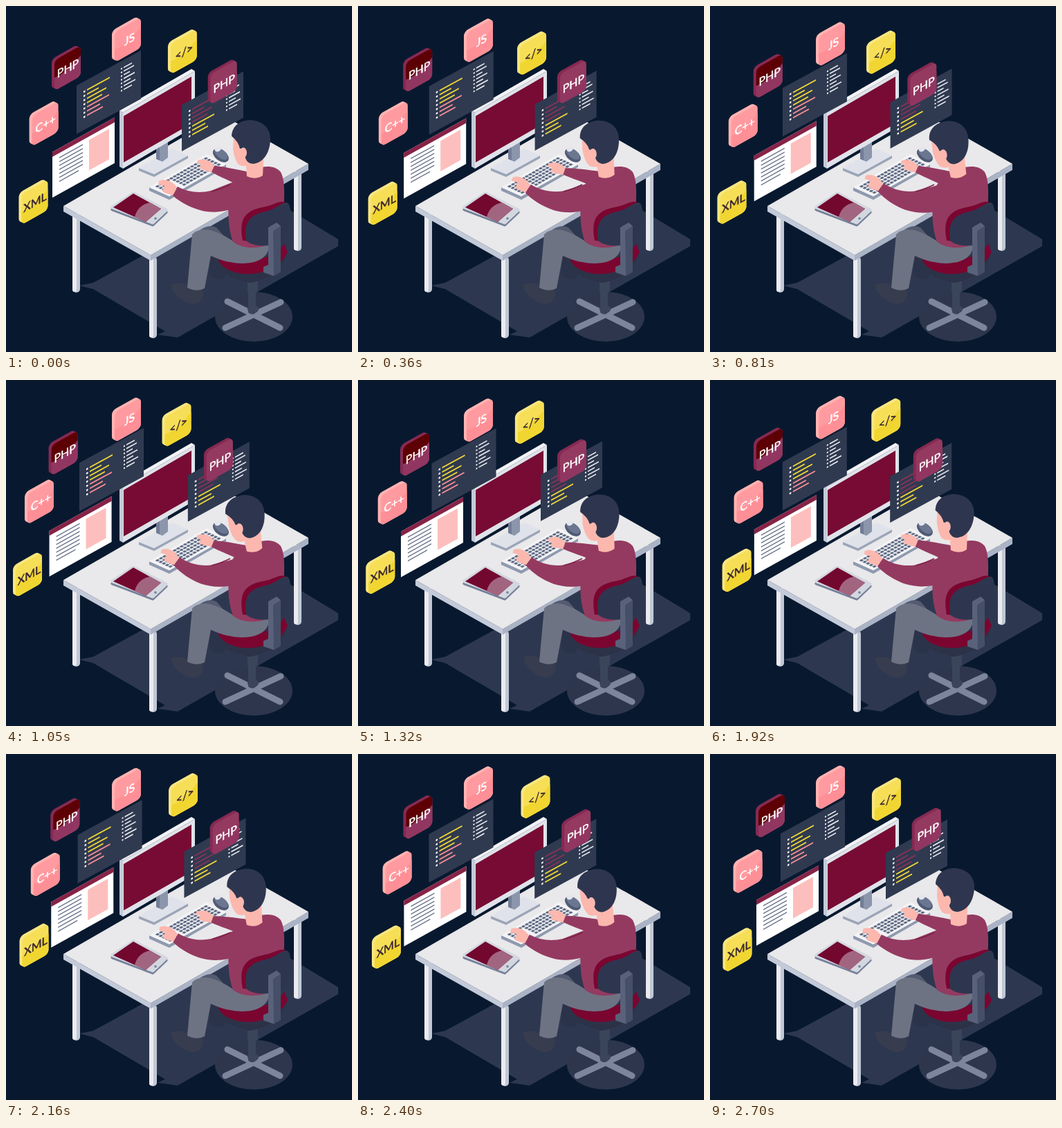
An HTML page for the animation above (2.76 s loop, 500x500 px).

```html
<!DOCTYPE html>
<html lang="en">
<head>
<meta charset="utf-8">
<title>Programmer at a desk</title>
<style>
html, body { margin: 0; height: 100%; overflow: hidden; background: #08192f; }
svg { display: block; width: 100%; height: 100%; }
text { font: 16px Lato, sans-serif; text-anchor: middle; stroke-width: .5; }
</style>
</head>
<body>
<svg viewBox="0 0 500 500">
  <path fill="#2d3850" d="M106 404 126 400 300 305 412 296 480 337V347L248 479 219 475 230 470 126 409Z"/>

  <!-- desk -->
  <g id="legs"></g>
  <path fill="#c3cad9" d="M83 289 209 360V368L83 297Z"/>
  <path fill="#aab4c6" d="M209 360 437 228V237L209 368Z"/>
  <path fill="#e9e8ea" d="M83 289 312 157 437 228 209 360Z"/>

  <!-- monitor -->
  <path fill="#9ba5b8" d="M192 234 214 243 263 216V220L214 247 192 238Z"/>
  <path fill="#dfe2ea" d="M192 234 240 206 263 216 214 243Z"/>
  <path fill="#8b95ab" d="M217 200 234 192V219L226 225 217 221Z"/>
  <path fill="#717c95" d="M217 200 222 198V223L217 221Z"/>
  <path fill="#c3cad9" d="M164 151 169 154V235L164 232Z"/>
  <path fill="#f1f2f5" d="M164 151 268 91 273 94 169 154Z"/>
  <path fill="#e0e2ea" d="M169 154 273 94V174L169 235Z"/>
  <path fill="#770b34" d="M170 159 268 102V170L170 226Z"/>

  <g id="panels"></g>
  <g id="cards"></g>

  <!-- tablet -->
  <g stroke-linejoin="round" stroke-width="5">
    <path fill="#76819a" stroke="#76819a" d="M154 294 184 274 231 298 212 316Z"/>
    <path fill="#d3d7e0" stroke="#d3d7e0" d="M154 291 184 271 231 295 212 313Z"/>
  </g>
  <path fill="#73082f" d="M155 291 184 271 224 293 202 312Z"/>
  <path fill="#a26580" d="M186 305Q190 288 208 284L224 293 202 312Z"/>
  <circle cx="216" cy="307" r="1.800" fill="#76819a"/>

  <!-- keyboard and mouse -->
  <path fill="#8f9ab0" d="M207 262 236 275 318 229V233L236 280 207 267Z"/>
  <path fill="#f3f3f5" d="M207 262 290 214 318 229 236 275Z"/>
  <g transform="matrix(.83 -.48 .29 .14 207 262)" fill="none" stroke="#5d6983" stroke-width="11">
    <path stroke-dasharray="4.5 1.5" d="M6 18H95M6 34H24M30 34H95M6 50H24M30 50H95M6 66H24M30 66H95M6 82H24M30 82H95"/>
  </g>
  <g transform="rotate(37 311 215)">
    <ellipse cx="311" cy="216" rx="13" ry="8" fill="#4f5a75"/>
    <ellipse cx="310" cy="214" rx="11.500" ry="6" fill="#6b7690"/>
    <path fill="#e4e6ec" d="M298 214Q298 207 306 207V212Q303 218 298 214Z"/>
  </g>

  <!-- chair base -->
  <ellipse cx="358" cy="449" rx="56" ry="36" fill="#2d364c"/>
  <g stroke="#7c859c" stroke-width="9" stroke-linecap="round">
    <path d="M320 427 396 465M397 428 317 465"/>
  </g>
  <path fill="#3a445b" d="M349 390H364V412L361 415V443Q357 448 350 443V415L349 412Z"/>
  <ellipse cx="357" cy="438" rx="8" ry="6" fill="#3a445b"/>

  <!-- far leg, seat and shoe -->
  <path fill="#2b334a" d="M295 340 325 350 316 392Q305 400 294 388Z"/>
  <path fill="#2c3348" d="M302 360Q300 389 352 400Q392 394 405 362Z"/>
  <path fill="#7a0630" d="M305 358C325 374 385 372 402 343L407 355C396 384 352 394 326 383Q306 376 305 358Z"/>
  <path id="shoe" fill="#373d4e" d="M239 402C253 397 264 405 284 409C287 422 281 432 268 430C255 428 238 414 239 402Z"/>
  <path fill="#545b70" d="M280 324Q292 315 304 320L318 336 290 345Z"/>
  <path fill="#6e7384" d="M269 330C284 316 306 325 330 341C350 350 366 349 380 344C382 374 336 380 296 361L287 408Q275 414 262 407Z"/>

  <!-- arms, body, head -->
  <g id="farArm">
    <path fill="#fcb8ae" d="M301 231C295 222 284 220 277 223L276 227 282 229 279 234Q286 238 300 241Z"/>
    <path fill="#943a60" d="M301 231C315 232 332 236 352 240L342 262C325 253 309 247 297 240Z"/>
  </g>
  <path fill="#943a60" d="M346 242C362 233 385 226 397 240C405 255 401 280 402 305L382 344Q350 356 328 341C320 318 321 298 322 270Q330 250 346 242Z"/>
  <g id="nearArm">
    <path fill="#fcb8ae" d="M247 262C240 252 229 249 221 253L220 258 229 260 226 268Q234 273 243 273Z"/>
    <path fill="#943a60" d="M248 261C262 269 280 271 296 267L334 252 344 286C318 299 300 299 284 296C268 292 252 284 241 274Z"/>
  </g>
  <path fill="none" stroke="#7d2249" stroke-width="1.500" d="M297 268Q310 265 324 258"/>
  <g id="head">
    <path fill="#fcb8ae" d="M329 185 328 206Q330 223 336 229 341 232 347 231L348 246Q360 252 371 245L373 205Z"/>
    <path fill="#2e364f" d="M326 188C327 172 339 165 354 165C372 166 383 178 382 194C381 212 372 227 357 228Q349 228 346 220L345 206 338 206Q336 196 326 188Z"/>
    <ellipse cx="343" cy="212" rx="5" ry="7.500" fill="#fcb8ae"/>
  </g>

  <!-- chair back -->
  <path fill="#7a0630" d="M342 339C336 307 346 296 370 291C392 287 395 279 407 285L395 342Z"/>
  <path fill="#2e364f" d="M347 339C343 311 353 302 375 297C393 293 399 281 408 285C414 295 410 315 408 331C402 347 360 352 347 339Z"/>
  <path fill="#59627a" d="M379 320 391 313 397 318V384L387 390 372 385V377L379 374Z"/>
  <path fill="#454f67" d="M386 325 397 318V384L387 390Z"/>
</svg>
<script>
const $ = id => document.getElementById(id);
const YELLOW = '#f3d935', PINK = '#ff8f96', WINE = '#8e3159';
const rect = (x, y, w, h, fill, rx = 0) =>
  `<rect x="${x}" y="${y}" width="${w}" height="${h}" rx="${rx}" fill="${fill}"/>`;
const face = (x, y, slope, content) => `<g transform="matrix(1 ${slope} 0 1 ${x} ${y})">${content}</g>`;

// Desk legs: x, top, bottom
$('legs').innerHTML = [[96, 300, 414], [207, 362, 480], [416, 238, 354]].map(([x, top, end]) =>
  rect(x, top, 11, end - top, '#c0c8d6', 5) + rect(x, top, 6, end - top - 1, '#ebebee', 3)).join('');

function codePanel(width, height, colors) {
  let s = rect(0, 0, width, height, '#2f3a50');
  [33, 17, 28, 22, 32, 19, 23].forEach((w, i) => {
    const row = 13.5 + i * 6.1;
    s += rect(10, row, 2.5, 2.5, '#fff') + rect(15, row, w, 2, colors[i]);
  });
  [12, 15, 9, 16, 10, 17, 12].forEach((w, i) => {
    const row = 10 + i * 5.3;
    s += rect(64, row, 2, 2, '#fff') + rect(68, row, w, 1.8, '#e9ebf0');
  });
  return face(0, 0, -.545, s);
}

function pagePanel() {
  let s = rect(0, 0, 90, 66, '#fff') + rect(0, 0, 90, 7, '#862347') + rect(53, 12, 29, 44, '#fdbfbd');
  for (let i = 0; i < 7; i++) s += rect(10, 13 + i * 5.7, i == 6 ? 28 : 34, 1.5, '#656d86');
  return face(0, 0, -.555, s);
}

function card({ label, front, side, low, top, ink = '#fff', tx = 19.5, ty = 28 }) {
  const lower = 'M0 25Q16 29 38 14V38a6 6 0 0 1-6 6H6a6 6 0 0 1-6-6Z';
  const upper = 'M0 25V6a6 6 0 0 1 6-6H32a6 6 0 0 1 6 6V14Q16 29 0 25Z';
  let s = '';
  for (let i = 0; i < 4; i++) s += face(i, 19.5 + i / 2, -.56, rect(0, 0, 38, 44, side, 6));
  return s + face(4, 21.5, -.56, rect(0, 0, 38, 44, front, 6) +
    `<path d="${lower}" fill="${low}"/>` + (top ? `<path d="${upper}" fill="${top}"/>` : '') +
    `<text x="${tx}" y="${ty}" fill="${ink}" stroke="${ink}">${label}</text>`);
}

const sway = a => (1 - Math.cos(a)) / 2;
const orbit = (cx, cy, rx, ry, px, py) => a => [cx + rx * Math.cos(a + px), cy + ry * Math.sin(a + py)];
const drift = (x, y, dx, dy) => a => [x + dx * sway(a), y + dy * sway(a)];

const pink = { front: '#ff9ba0', side: '#ffb3b2', low: PINK };
const yellow = { front: '#f6df57', side: '#f9e680', low: '#f1d632', ink: '#3a2630' };
const wine = { front: '#943a60', side: '#862a53', low: '#913660' };

const floats = [];
function add(layer, content, path) {
  const g = document.createElementNS('http://www.w3.org/2000/svg', 'g');
  g.innerHTML = content;
  $(layer).append(g);
  floats.push({ g, path });
}

const rows = (a, b) => [a, a, a, a, b, b, b];
add('panels', codePanel(93, 70, rows(YELLOW, PINK)), drift(102, 115, 4.5, 5.5));
add('panels', codePanel(89, 67, rows(WINE, YELLOW)), drift(254, 143, 10, -6));
add('panels', pagePanel(), drift(67, 211, -5, 8));
add('cards', card({ ...wine, label: 'PHP', top: '#5d0005' }), drift(66, 57, -5, 18));
add('cards', card({ ...pink, label: 'JS', tx: 21.5 }), drift(153, 16, 0, 10));
add('cards', card({ ...yellow, label: '&lt;/&gt;' }), orbit(230.5, 31, 5, 5.3, .82, .45));
add('cards', card({ ...pink, label: 'C++' }), orbit(31.3, 141.5, 4.6, 4.5, 1.05, -2));
add('cards', card({ ...yellow, label: 'XML' }), orbit(15, 248, 5, 5.2, .8, .5));
add('cards', card({ ...wine, label: 'PHP', ty: 30 }), orbit(290, 81, 4.7, 4.2, 1.2, -1.97));

// Eased interpolation through [time, value] pairs
function ease(keys, t) {
  const i = Math.max(1, keys.findIndex(k => k[0] >= t));
  const [t0, v0] = keys[i - 1], [t1, v1] = keys[i];
  return v0 + (v1 - v0) * sway(Math.PI * (t - t0) / (t1 - t0));
}
const nod = [[0, 0], [660, 1], [1000, 1], [1660, 0], [1860, 0], [2320, 1], [2360, 1], [2700, 0]];
const reach = [[0, 0], [600, 1], [1300, 1], [1900, .75], [2400, 0], [2700, 0]];
const tap = [[0, 0], [1080, 0], [1320, 1], [1560, 0], [2700, 0]];
const move = (id, value) => $(id).setAttribute('transform', value);

function draw(now) {
  const t = Math.min(2700, Math.floor(now % 2760 / 30) * 30);
  const a = 2 * Math.PI * t / 2700;
  for (const { g, path } of floats) g.setAttribute('transform', `translate(${path(a)})`);
  move('head', `rotate(${-9 * ease(nod, t)} 357 248)`);
  move('nearArm', `rotate(${6.5 * ease(reach, t)} 294 284)`);
  move('farArm', `rotate(${-5 * sway(3 * a)} 342 249)`);
  move('shoe', `rotate(${4 * ease(tap, t)} 275 422)`);
  requestAnimationFrame(draw);
}
draw(0);
</script>
</body>
</html>
```
